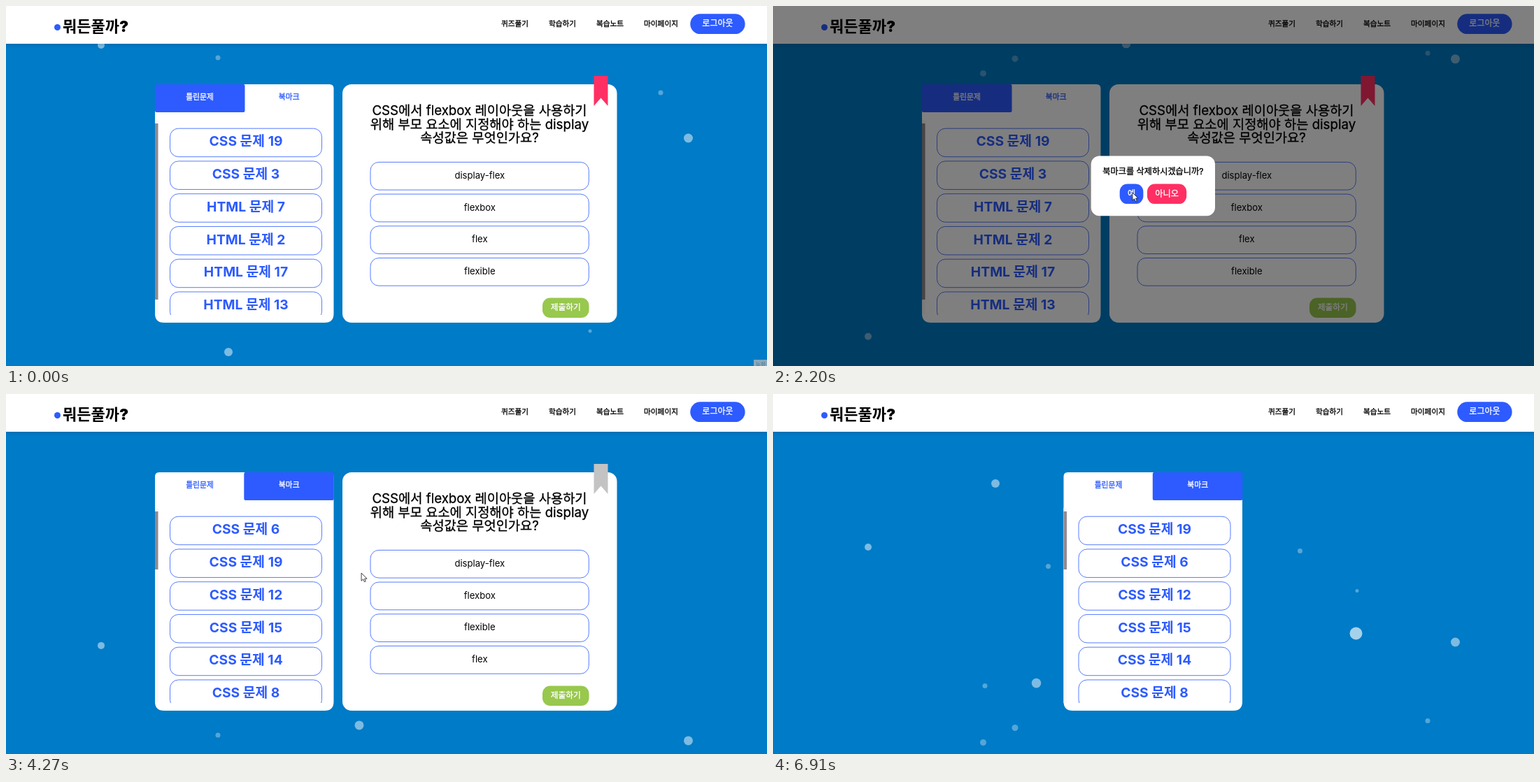
An HTML page for the animation above (6990 ms loop, 1088x515 px).

```html
<!DOCTYPE html>
<html lang="ko">
<head>
<meta charset="utf-8">
<title>복습노트</title>
<style>
html, body { margin: 0; width: 100%; height: 100%; overflow: hidden; background: #007bc7; }
svg { display: block; width: 1088px; height: 515px; font-family: Inter, "Noto Sans CJK KR", "Noto Sans CJK", sans-serif; }
text { text-anchor: middle; }
.logo { text-anchor: start; font-weight: 900; }
</style>
</head>
<body>
<svg id="stage" viewBox="0 0 1088 515"></svg>
<script>
const LOOP = 6990, FRAME = 1000 / 15, LAST = 103;
const BLUE = '#2d5bff', PINK = '#ff2f63', GRAY = '#c3c3c3';
const FIELD = 520;

// x, radius, start y; speed and opacity follow from the radius
const BUBBLES = [
  [136, 5, 586], [303, 3.5, 74], [936, 3.5, 124], [975.5, 6.5, 189], [835, 2.5, 465],
  [318, 6, 495], [346, 4.5, 132], [505, 6.5, 167], [767, 8, 558], [767, 8.5, 543],
  [300.5, 4.5, 153], [376.5, 6.8, 247], [833.5, 9, 355], [393.5, 3.5, 430], [753.5, 3.5, 408]
].map(([x, r, y]) => ({ x, r, y, speed: Math.ceil((r - 1.5) / 3) }));

// tick, distance risen by the slowest bubbles
const RISE = [[0, 0], [40, 68.6], [55, 97.8], [79, 138.5], [LAST, 183.5]];

// tick, pointer x, pointer y
const PATH = [
  [1, 1092, 520], [14, 844.5, 120], [20, 844.5, 120], [32, 514, 267],
  [66, 508, 256], [77, 846, 113], [82, 693, 175], [102, 1092, 512]
];
const STARTS = [0, 42, 62, 81];
const OPEN = 16, CLOSE = 36;

const stage = document.getElementById('stage');
const get = id => document.getElementById(id);

// medium weight is a regular face with a hairline stroke
const text = (x, y, size, str, fill = '#000', weight = 400) =>
  `<text x="${x}" y="${y}" font-size="${size}" fill="${fill}" font-weight="${weight === 500 ? 400 : weight}"
    ${weight === 500 ? `stroke="${fill}" stroke-width=".3"` : ''}>${str}</text>`;
const box = (x, y, w, h, r, fill, extra = '') =>
  `<rect x="${x}" y="${y}" width="${w}" height="${h}" rx="${r}" fill="${fill}" ${extra}/>`;
const button = (x, y, w, h, r, fill, label, size) =>
  box(x, y, w, h, r, fill) + text(x + w / 2, y + h / 2 + 3.7, size, label, '#fff', 500);
const outline = `stroke="${BLUE}" stroke-width=".8"`;

function panel(x, saved, items, hover = -1) {
  const rows = items.map((name, i) => {
    const y = 175.2 + i * 46.75, on = i === hover;
    return box(x + 21.5, y, 217, 40.5, 12, on ? BLUE : '#fff', outline) +
      text(x + 130, y + 25.2, 19.3, name, on ? '#fff' : BLUE, 700);
  }).join('');
  const tabs = ['틀린문제', '북마크'].map((label, i) => {
    const active = saved === (i === 1);
    return (active ? '' : box(x + i * 127.3, 112, 128.5, 40, 2, BLUE)) +
      text(x + 64 + i * 127.7, 134.3, 10.8, label, active ? BLUE : '#fff', 500);
  }).join('');
  return `<path d="M${x} 118q0-6 6-6h243.5q6 0 6 6v322q0 13-13 13h-229.5q-13 0-13-13z" fill="#fff"/>` + tabs +
    box(x, 163, 4.5, 279, 0, '#f8f8f8') +
    box(x, 168, 4.5, saved ? 252 : 83, 0, '#8f8a90') +
    `<g clip-path="url(#list)">${rows}</g>`;
}

function question(options, markId, markColor) {
  const lines = ['CSS에서 flexbox 레이아웃을 사용하기', '위해 부모 요소에 지정해야 하는 display', '속성값은 무엇인가요?'];
  return box(481, 112, 392.5, 341, 13, '#fff') +
    lines.map((s, i) => text(677, 155.7 + i * 19.8, 18.7, s, '#000', 500)).join('') +
    options.map((s, i) => {
      const y = 223.4 + i * 45.7;
      return box(521, y, 312.3, 39.7, 12, '#fff', outline) + text(677.3, y + 23.4, 13.1, s);
    }).join('') +
    button(767, 417.5, 66.5, 28.5, 11, '#98c84d', '제출하기', 11.7) +
    `<path id="${markId}" d="M840.5 100h20v43l-10-11.5-10 11.5z" fill="${markColor}"/>`;
}

const css = (...nums) => nums.map(n => 'CSS 문제 ' + n);
const html = (...nums) => nums.map(n => 'HTML 문제 ' + n);
const wrong = css(6, 19, 12, 15, 14, 8);
const scenes = [
  panel(213, true, [...css(19, 3), ...html(7, 2, 17, 13)]) +
    question(['display-flex', 'flexbox', 'flex', 'flexible'], 'mark', PINK),
  panel(415.5, false, wrong, 1),
  panel(213, false, wrong) + question(['display-flex', 'flexbox', 'flexible', 'flex'], 'mark2', GRAY),
  panel(415.5, false, [wrong[1], wrong[0], ...wrong.slice(2)])
];

const nav = [[727.5, '퀴즈풀기'], [795.5, '학습하기'], [863.5, '복습노트'], [936.5, '마이페이지']];

stage.innerHTML = `
<defs>
  <clipPath id="list"><rect y="160" width="1088" height="282"/></clipPath>
  <linearGradient id="shade" x2="0" y2="1">
    <stop stop-opacity=".1"/><stop offset="1" stop-opacity="0"/>
  </linearGradient>
</defs>
<rect width="1088" height="515" fill="#007bc7"/>
<g id="bubbles" fill="#fff">${BUBBLES.map(b =>
  `<circle cx="${b.x}" r="${b.r}" opacity="${.17 + .16 * b.speed}"/>`).join('')}</g>
${scenes.map((s, i) => `<g id="scene${i}">${s}</g>`).join('')}
${box(0, 54, 1088, 6, 0, 'url(#shade)')}
${box(0, 0, 1088, 54, 0, '#fff')}
<circle cx="73.5" cy="30.5" r="4.5" fill="${BLUE}"/>
<text class="logo" x="81" y="36.5" font-size="22">뭐든풀까?</text>
${nav.map(([x, s]) => text(x, 28.8, 10.65, s, '#000', 500)).join('')}
${button(978.3, 11.3, 78.3, 28.8, 14.4, BLUE, '로그아웃', 12)}
<g id="chip">${box(1069, 506, 19, 9, 0, '#86a9c0')}${text(1079, 516, 8, '녹화', '#56788f')}</g>
<g id="modal">
  <rect width="1088" height="515" opacity=".5"/>
  ${box(454.7, 214.5, 177.3, 85.7, 12, '#fff')}
  ${text(543.4, 241.3, 12.2, '북마크를 삭제하시겠습니까?', '#000', 500)}
  ${button(495.7, 254.5, 33.7, 28.6, 11, BLUE, '예', 12.2)}
  ${button(535, 254.5, 56.2, 28.6, 11, PINK, '아니오', 12.2)}
</g>
<g id="pointer">
  <path id="arrow" d="M0 0V11.2L2.6 8.8 4.3 12.6 6.2 11.8 4.6 8.1H8z" fill="#fff" stroke="#111" stroke-width=".8"/>
  <path id="hand" d="M-1 1q1-1.5 2 0v4.5l1-.6 1.2.8 1-.4 1.1.9.9-.1.6 1V10l-1.3 3.2H-.6L-3.8 8.4q-.2-1.6 1.4-1.1l1.4 1.4z" fill="#fff" stroke="#111" stroke-width=".8"/>
  <path id="ibeam" d="M-2.5-4.5H-.5L0-4 .5-4.5H2.5M0-4V4M-2.5 4.5H-.5L0 4 .5 4.5H2.5" fill="none" stroke="#222"/>
</g>`;

const dots = [...get('bubbles').children];
const show = (id, on) => get(id).setAttribute('visibility', on ? 'visible' : 'hidden');
const clamp = u => Math.max(0, Math.min(1, u));
const mod = (a, n) => ((a % n) + n) % n;
const linear = u => u;
const smooth = u => u * u * (3 - 2 * u);

function at(points, k, col, ease) {
  const next = points.findIndex(p => p[0] > k);
  const i = next < 0 ? points.length - 1 : Math.max(1, next);
  const a = points[i - 1], b = points[i];
  return a[col] + (b[col] - a[col]) * ease(clamp((k - a[0]) / (b[0] - a[0])));
}

function pointerShape(k, scene) {
  if (k < 1 || k >= 102) return 'none';
  if (scene === 1) return 'hand';
  return scene === 0 && k >= CLOSE ? 'ibeam' : 'arrow';
}

function mixMark(u) {
  const channel = from => Math.round(from + (195 - from) * u);
  return `rgb(${[255, 47, 99].map(channel)})`;
}

function draw(ms) {
  // 15 ticks a second, with a short stall late in the loop
  const k = Math.min(LAST, Math.floor((ms + (ms < 5500 ? 18 : -12)) / FRAME));
  const rise = at(RISE, k, 1, linear);
  BUBBLES.forEach(({ r, y, speed }, i) =>
    dots[i].setAttribute('cy', mod(y + r - speed * rise, FIELD + 2 * r) - r));

  const scene = STARTS.filter(s => s <= k).length - 1;
  scenes.forEach((_, i) => show('scene' + i, i === scene));
  show('modal', k >= OPEN && k < CLOSE);
  show('chip', k < 3);
  get('mark').setAttribute('fill', mixMark(clamp((k - CLOSE) / 4.5)));

  const shape = pointerShape(k, scene);
  for (const id of ['arrow', 'hand', 'ibeam']) show(id, id === shape);
  get('pointer').setAttribute('transform', `translate(${at(PATH, k, 1, smooth)} ${at(PATH, k, 2, smooth)})`);
}

const start = performance.now();
function tick() {
  draw((performance.now() - start) % LOOP);
  requestAnimationFrame(tick);
}
tick();
</script>
</body>
</html>
```
